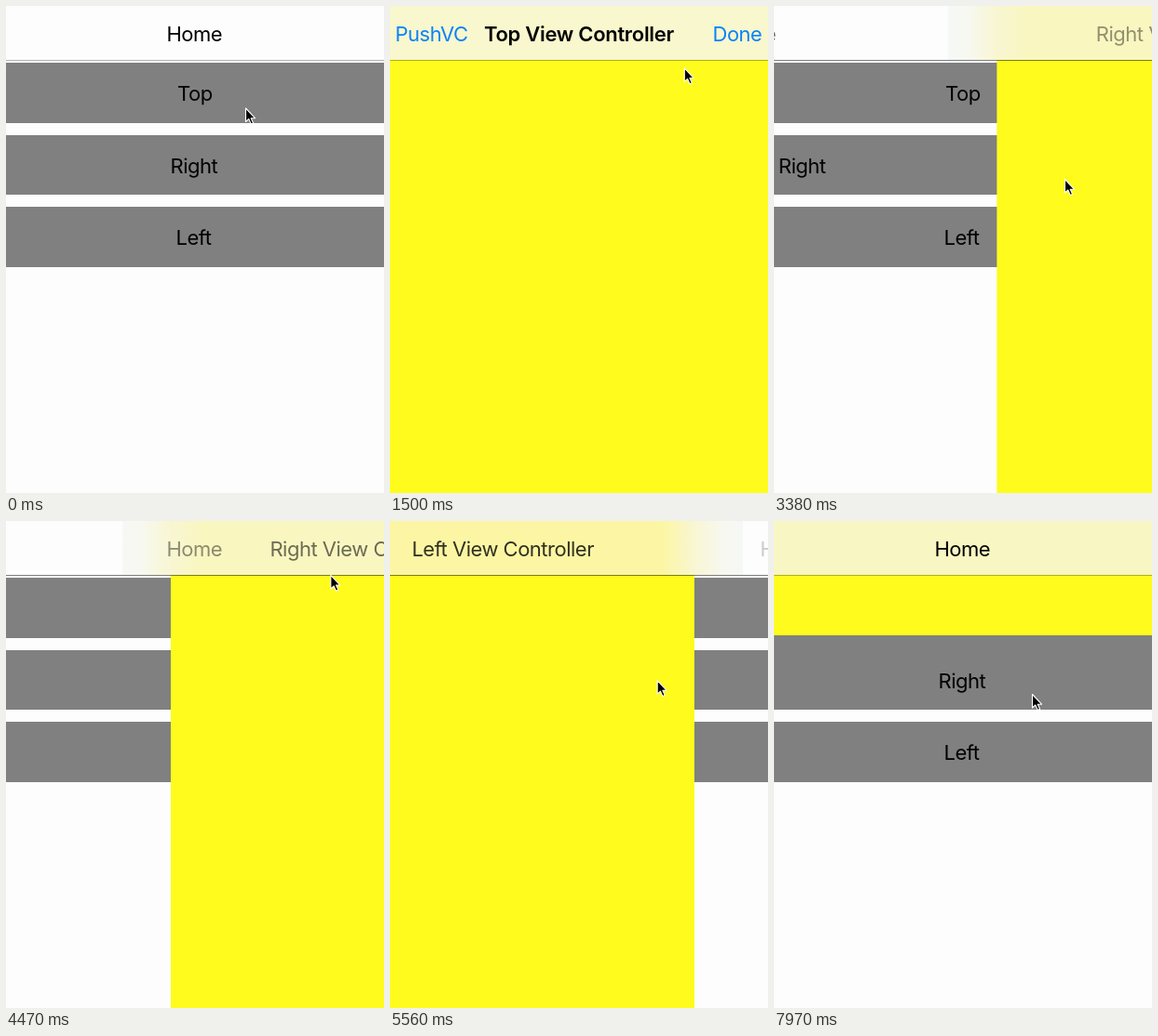
Recreate the animation shown at these times as an HTML page. Size 406 by 524 pixels, loop 8 s.

```html
<!DOCTYPE html>
<html lang="en">
<head>
<meta charset="utf-8">
<title>View transitions</title>
<style>
  html, body { margin: 0; width: 100%; height: 100%; overflow: hidden; background: #fdfdfd; }
  svg { display: block; width: 406px; height: 524px; }
  text { font: 400 22px Inter, Roboto, sans-serif; letter-spacing: -.5px; white-space: pre; }
  .bold { font-weight: 600; letter-spacing: -.3px; }
  .item { fill: #0a82fb; }
</style>
</head>
<body>
<svg viewBox="0 0 406 524">
  <defs>
    <linearGradient id="blur" gradientUnits="userSpaceOnUse" x1="-52" x2="34" y1="0" y2="0">
      <stop offset="0" stop-color="#f6f8f6" stop-opacity="0"/>
      <stop offset="0" stop-color="#f6f8f6"/>
      <stop offset=".25" stop-color="#f7f8f0"/>
      <stop offset=".6" stop-color="#f8f6d2"/>
      <stop id="tone" offset="1"/>
    </linearGradient>
  </defs>
  <rect width="406" height="524" fill="#fdfdfd"/>
  <g id="topButton">
    <rect y="61" width="406" height="65" fill="#808080"/>
    <text id="top" y="102">Top</text>
  </g>
  <rect y="139" width="406" height="64" fill="#808080"/>
  <text id="right" y="179.5">Right</text>
  <rect y="216" width="406" height="65" fill="#808080"/>
  <text id="left" y="257">Left</text>
  <rect id="panel" width="406" height="524" fill="#fffb1c"/>
  <rect width="406" height="58" fill="#fdfdfd"/>
  <rect id="tint" width="406" height="58"/>
  <rect id="hairline" y="58" width="406" height="1"/>
  <text id="home" y="38">Home</text>
  <text id="moving" y="38"></text>
  <g id="settled">
    <text class="item" x="5.5" y="38">PushVC</text>
    <text id="title" class="bold" x="203" y="38" text-anchor="middle"></text>
    <text id="done" class="item" x="346.5" y="38">Done</text>
  </g>
  <path id="cursor" d="M.5 .5V15L3.8 12L6.2 17.4L8.6 16.4L6.2 11.2H10.5Z" fill="#000" stroke="#fff" stroke-width="1.1" stroke-linejoin="round"/>
</svg>
<script>
const W = 406, H = 524, LOOP = 8000;
const $ = id => document.getElementById(id);
const set = (id, attrs) => {
  for (const name in attrs) $(id).setAttribute(name, attrs[name]);
};
const clamp = v => Math.min(1, Math.max(0, v));
const ramp = (t, start, length) => clamp((t - start) / length);
const smooth = v => v * v * (3 - 2 * v);

const TOP_TONE = '#f8f6c3';
const visits = [
  { side: 'top', open: 490, openTime: 370, press: 1950, close: 2120, closeTime: 350, tone: TOP_TONE },
  { side: 'right', open: 3249, openTime: 300, press: 4170, close: 4311, closeTime: 350, tone: '#f9f6c0' },
  { side: 'left', open: 5310, openTime: 350, press: 6270, close: 6420, closeTime: 333, tone: '#fcf6a4' }
];
const labelX = { top: 184, right: 176.5, left: 182.5 };
const DRAG = 7380, GRAB_Y = 64;

// time, x, y of the pointer tip
const pointer = [
  [0, 257, 109.5], [600, 257, 109.5], [850, 217, 109.5], [1210, 217, 109.5],
  [1500, 315.5, 66.5], [1800, 372, 34], [2200, 372, 34], [2900, 312, 186],
  [3420, 312, 186], [3950, 370, 34], [4320, 370, 34], [4470, 348.5, 57.5],
  [4900, 270, 240], [5310, 270, 240], [5560, 286.5, 171.5], [5900, 368, 34],
  [6430, 368, 34], [6640, 332.5, 53.5], [6780, 316, GRAB_Y], [6900, 285, GRAB_Y],
  [DRAG, 285, GRAB_Y], [7970, 277, 186], [LOOP, 277, 186]
];

function slope(i, axis) {
  const a = pointer[i - 1], b = pointer[i], c = pointer[i + 1];
  if (!a || !c) return 0;
  const before = b[axis] - a[axis], after = c[axis] - b[axis];
  return before * after <= 0 ? 0 : (before + after) / (c[0] - a[0]);
}

function pointerAt(t, axis) {
  const i = pointer.findIndex(p => p[0] > t) - 1;
  const a = pointer[i], b = pointer[i + 1];
  const span = b[0] - a[0], u = (t - a[0]) / span, k = smooth(u);
  return a[axis] * (1 - k) + b[axis] * k
    + span * u * (1 - u) * ((1 - u) * slope(i, axis) - u * slope(i + 1, axis));
}

function stateAt(t, y) {
  if (t > DRAG) return { side: 'top', p: (y - GRAB_Y + 1) / H, tone: TOP_TONE };
  const v = visits.find(v => t > v.open && t < v.close + v.closeTime);
  if (!v) return { side: 'top', p: 0 };
  const closing = t >= v.close;
  const p = closing ? 1 - smooth(ramp(t, v.close, v.closeTime)) : smooth(ramp(t, v.open, v.openTime));
  return { ...v, p, closing, pressed: t >= v.press };
}

function placePanel(side, p) {
  const hidden = 1 - p;
  const move = { top: [0, -H * hidden], right: [W * hidden, 0], left: [-W * hidden, 0] }[side];
  set('panel', { transform: `translate(${move})` });
  const axis = {
    top: `translate(0 ${H * p}) rotate(-90)`,
    right: `translate(${W * hidden})`,
    left: `translate(${W * p}) scale(-1 1)`
  }[side];
  set('blur', { gradientTransform: axis });
}

// The panel pushes the button it belongs to ahead of its edge.
function placeButtons(t, { side, p }) {
  const drop = side === 'top' ? Math.max(0, H * p - 61) : 0;
  set('topButton', { transform: `translate(0 ${drop})` });
  const push = { top: 0, right: -W * p * 1.03, left: W * p * 1.03 }[side];
  for (const v of visits) {
    const end = v.close + v.closeTime;
    const opacity = t >= v.close && t < end + 150 ? ramp(t, end + 10, 130) : 1;
    set(v.side, { x: labelX[v.side] + (side === v.side ? push : 0), opacity });
  }
}

function placeBar(s) {
  const { side, p } = s;
  const settled = p === 1 && !s.closing;
  const sliding = side !== 'top' && p > 0 && !settled;
  const name = side[0].toUpperCase() + side.slice(1) + ' View Controller';
  const shift = sliding && !s.closing ? { right: -230, left: 225 }[side] : 0;

  set('tone', { 'stop-color': s.tone || TOP_TONE });
  set('tint', { fill: settled ? '#f8f7cd' : 'url(#blur)', opacity: p > 0 ? 1 : 0 });
  set('hairline', { 'fill-opacity': sliding ? .5 : .3 });
  set('home', { x: 172.5 + shift, opacity: settled ? 0 : sliding ? 1 - p : 1 });
  $('moving').textContent = name;
  set('moving', {
    x: side === 'right' ? W * (1 - p) + 106.5 : W * p - 303.5,
    opacity: sliding ? p : 0
  });
  $('title').textContent = name;
  set('settled', { visibility: settled ? 'visible' : 'hidden' });
  set('done', { opacity: s.pressed ? .3 : 1 });
}

function draw(now) {
  const t = now % LOOP;
  const x = pointerAt(t, 1), y = pointerAt(t, 2);
  const s = stateAt(t, y);
  placePanel(s.side, s.p);
  placeButtons(t, s);
  placeBar(s);
  set('cursor', { transform: `translate(${x} ${y})` });
}

const begin = performance.now();
function tick() {
  draw(performance.now() - begin);
  requestAnimationFrame(tick);
}
tick();
</script>
</body>
</html>
```
